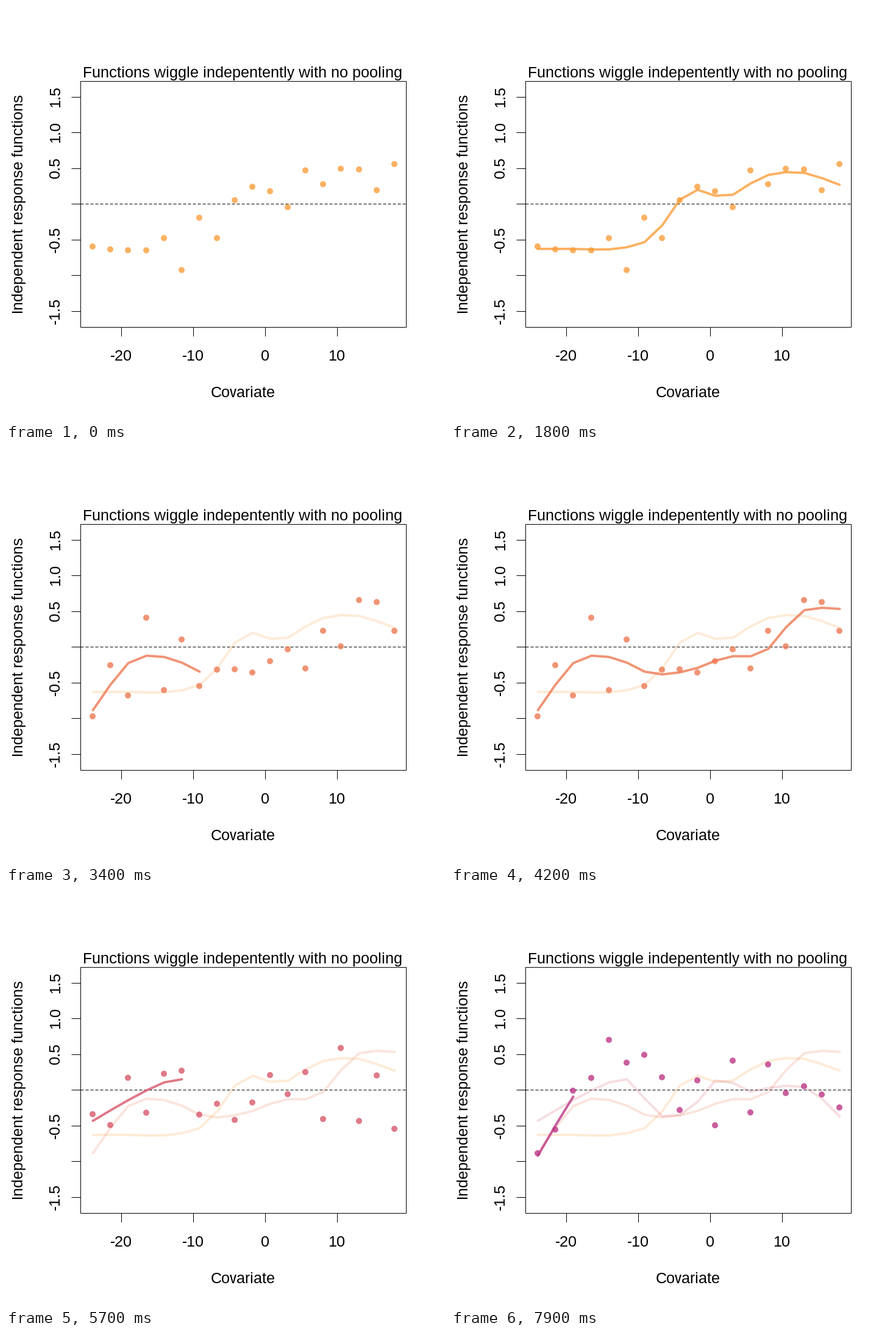
A matplotlib script for the animation above (8000 ms loop, 720x680 px).

```python
import matplotlib.pyplot as plt
import numpy as np
from matplotlib.animation import FuncAnimation
from matplotlib.patches import Circle

W, H, DPI = 720, 680, 100
PX = 72 / DPI                        # one pixel in points
LEFT, RIGHT, TOP, BOTTOM = 122.5, 656.5, 123.5, 526.5
ZERO = 324.5
N, STEPS = 18, 13                    # points per curve, drawing steps
CYCLE, WAIT = 24, 5                  # frames per curve, frames before drawing

plt.rcParams.update({
    "font.family": "Liberation Sans",
    "font.size": 25 * PX,
    "text.hinting": "native",
    "text.hinting_factor": 1,
})


def smooth(keys):
    """Cubic Hermite curve through evenly spaced keys, sampled N times."""
    keys = np.array(keys, float)
    slope = np.gradient(keys)
    pos = np.linspace(0, len(keys) - 1, N)
    k = np.minimum(pos.astype(int), len(keys) - 2)
    u = pos - k
    rise = u * u * (3 - 2 * u)
    return (keys[k] * (1 - rise) + keys[k + 1] * rise
            + slope[k] * u * (1 - u) ** 2
            - slope[k + 1] * u * u * (1 - u))


def series(color, bends, sway):
    """The dots alternate above and below the curve by a swaying distance."""
    curve = smooth(bends)
    return color, curve, curve + (-1) ** np.arange(N) * smooth(sway)


SERIES = [
    series("#FA9E3B", [398, 398, 398, 380, 304, 313, 279, 273, 293],
           [-4, 0, -42, 6, -22, -4, 34]),
    series("#ED7953", [428, 348, 342, 368, 363, 341, 333, 266, 262],
           [10, 62, 28, -8, 14, 30, -36]),
    series("#D8576B", [375, 346, 320, 308, 365, 358, 306, 327, 318, 323, 368],
           [-11, -38, 25, 3, -22, -62, -20]),
    series("#BD3786", [432, 330, 256, 290, 343, 330, 312, 322, 345],
           [-4, -12, -18, 30, 50, 12, -8]),
]
XS = np.floor(142.8 + 29.08 * np.arange(N))

fig = plt.figure(figsize=(W / DPI, H / DPI), dpi=DPI, facecolor="white")
ax = fig.add_axes([0, 0, 1, 1])
ax.set_xlim(0, W)
ax.set_ylim(H, 0)
ax.axis("off")


def stroke(xs, ys, **kw):
    ax.plot(xs, ys, color="black", lw=PX, solid_capstyle="butt",
            solid_joinstyle="miter", snap=False, zorder=1, **kw)


def label(x, y, text, angle=0):
    ax.text(x, y, text, ha="center", va="baseline", rotation=angle,
            rotation_mode="anchor")


def draw_axes():
    stroke([LEFT, RIGHT, RIGHT, LEFT, LEFT],
           [TOP, TOP, BOTTOM, BOTTOM, TOP])
    stroke([LEFT, RIGHT], [ZERO, ZERO], dashes=(5, 3), dash_capstyle="butt")
    for v in (-20, -10, 0, 10):
        x = np.floor(425.3 + 11.8 * v) + 0.5
        stroke([x, x], [BOTTOM, BOTTOM + 15])
        label(x - 1, 581, str(v))
    for v in np.arange(-1.5, 2, 0.5):
        y = np.floor(324.8 - 116.9 * v) + 0.5
        stroke([LEFT - 15, LEFT], [y, y])
        if v not in (0, -1):
            label(88, y - 1, f"{v:.1f}", 90)
    middle = (LEFT + RIGHT) / 2 - 1
    label(middle, 117, "Functions wiggle indepentently with no pooling")
    label(middle, 641, "Covariate")
    label(28, (TOP + BOTTOM) / 2 - 1, "Independent response functions", 90)


draw_axes()
curves = [ax.plot([], [], color=color, lw=3.9 * PX, zorder=2 + i,
                  solid_capstyle="round", solid_joinstyle="round")[0]
          for i, (color, _, _) in enumerate(SERIES)]
dots = [ax.add_patch(Circle((x, 0), 5, lw=0, alpha=0.8)) for x in XS]


def update(frame):
    current, t = divmod(frame, CYCLE)
    step = min(max(t - WAIT, 0), STEPS)
    shown = (N - 1) * step // STEPS + 1 if step else 0

    color, _, heights = SERIES[current]
    for dot, x, y in zip(dots, XS, heights):
        dot.center = (x, y)
        dot.set_facecolor(color)
        dot.set_zorder(current + 1.5)

    for i, (curve, (_, ys, _)) in enumerate(zip(curves, SERIES)):
        n = N if i < current else shown if i == current else 0
        curve.set_data(XS[:n] + 0.5, ys[:n])
        curve.set_alpha(0.2 if i < current else 0.8)
    return curves + dots


anim = FuncAnimation(fig, update, frames=80, interval=100, repeat=True,
                     repeat_delay=0, blit=False)
plt.show()
```
